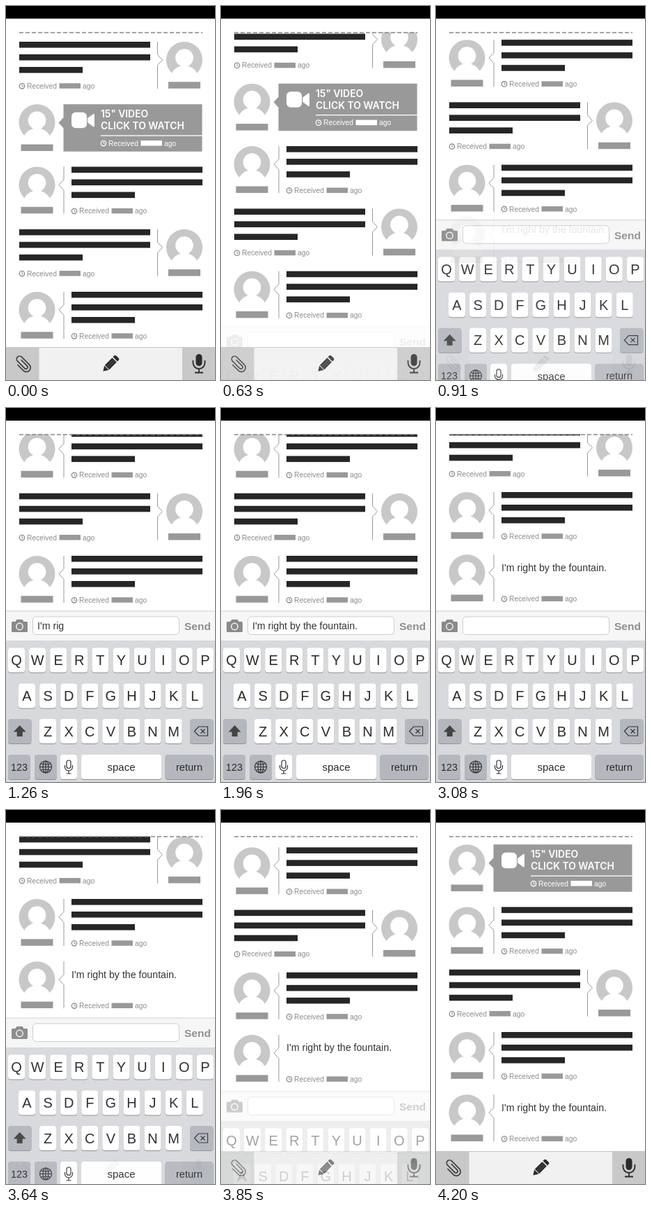
An HTML page for the animation above (4550 ms loop, 300 by 534 pixels).

```html
<!DOCTYPE html>
<html lang="en">
<head>
<meta charset="utf-8">
<title>Message thread</title>
<style>
  html, body { margin: 0; width: 100%; height: 100%; overflow: hidden; background: #fff; }
  svg { display: block; width: 100vw; height: 100vh; font-family: "Liberation Sans", Arial, sans-serif; }
</style>
</head>
<body>
<svg viewBox="0 0 300 534" preserveAspectRatio="none">
  <defs>
    <clipPath id="view"><rect y="37.5" width="300" height="500"/></clipPath>
    <g id="avatar">
      <circle r="26" fill="#c8c8c8"/>
      <circle cy="-3" r="12.8" fill="#fff"/>
      <ellipse cy="26.5" rx="20" ry="18.5" fill="#fff"/>
      <rect x="-23" y="31.3" width="46" height="9.5" fill="#999"/>
    </g>
  </defs>
  <rect width="300" height="534" fill="#fff"/>
  <g clip-path="url(#view)"><g id="list"></g></g>
  <path d="M19 38H282" stroke="#888" stroke-width="1.3" stroke-dasharray="6 3"/>
  <rect width="300" height="18" fill="#000"/>
  <g id="keyboard"></g>
  <g id="ghost"></g>
  <g id="toolbar">
    <rect y="487" width="300" height="47" fill="#f1f1f1"/>
    <path d="M0 487h47.500v47H0zM253 487h47v47h-47z" fill="#c8c8c8"/>
    <path d="M0 487.500H300" stroke="#c4c4c4"/>
    <path transform="translate(24 511) rotate(-45)" d="M2.500-5V6.500a2.500 2.500 0 0 1-5 0V-8a4.200 4.200 0 0 1 8.400 0V7.500a6 6 0 0 1-12 0V-4"
      fill="none" stroke="#3a3a3a" stroke-width="1.6" stroke-linecap="round"/>
    <g transform="translate(150 511) rotate(-45)" fill="#2b2b2b">
      <path d="M-15 0L-8-4.500V4.500zM-7-4.500H8V4.500H-7zM9.500-4.500H12a2 2 0 0 1 2 2V2.500a2 2 0 0 1-2 2H9.500z"/>
      <path d="M-6-1.300H8M-6 1.600H8" stroke="#777" stroke-width=".6"/>
    </g>
    <g fill="none" stroke="#2b2b2b" stroke-width="1.8">
      <rect x="272.500" y="497" width="9" height="17" rx="4.500" fill="#2b2b2b" stroke="none"/>
      <path d="M268.500 506v3.500a8.500 8.500 0 0 0 17 0V506M277 518v5M271 523.500h12"/>
    </g>
  </g>
</svg>
<script>
const $ = id => document.getElementById(id);
const LOOP = 4550, STEP = 70;
const TOP = 51, GAP = 89.25;
const RISE = 197, KEPT = 91;
const NOTE = "I'm right by the fountain.";

const rect = (x, y, w, h, fill, extra = '') =>
  `<rect x="${x}" y="${y}" width="${w}" height="${h}" fill="${fill}" ${extra}/>`;
const text = (x, y, size, fill, str, extra = '') =>
  `<text x="${x}" y="${y}" font-size="${size}" fill="${fill}" ${extra}>${str}</text>`;

// Messages
function received(x, y, ink, block) {
  return `<g fill="none" stroke="${ink}" stroke-width="1.3"><circle cx="${x + 4}" cy="${y}" r="3.700"/>
    <path d="M${x + 4} ${y - 2.2}v2.400h2" stroke-width="1"/></g>`
    + text(x + 11, y + 3.6, 10.3, ink, 'Received')
    + rect(x + 57.5, y - 4, 30.5, 7.5, block)
    + text(x + 91, y + 3.6, 10.3, ink, 'ago');
}

const bars = x => [188, 188, 91].map((w, i) => rect(x, i * 18, w, 8.6, '#262626')).join('');
const avatar = x => `<use href="#avatar" x="${x}" y="26"/>`;
const rule = (x, dir) =>
  `<path d="M${x} 0V18.500l${7 * dir} 7.500l${-7 * dir} 7.500V67" fill="none" stroke="#999"/>`;

const rightMsg = () => bars(19) + received(19, 63.3, '#8c8c8c', '#999') + rule(217.5, 1) + avatar(256);
const leftMsg = body => avatar(44.5) + rule(83, -1) + body + received(94, 63.3, '#8c8c8c', '#999');
const noteMsg = () => leftMsg(text(94, 23.4, 14.2, '#333', NOTE));

function videoMsg() {
  const bold = 'font-weight="600" font-family="Inter, sans-serif"';
  return avatar(44.5)
    + '<path d="M82.500 0H281.500V67.500H82.500V34L75.500 26.500L82.500 19z" fill="#999"/>'
    + rect(94, 11.5, 22, 22.5, '#fff', 'rx="6"')
    + '<path d="M117 20l8-6q2-1 2 1v16q0 2-2 1l-8-6z" fill="#fff"/>'
    + text(136, 19, 13.9, '#fff', '15" VIDEO', bold)
    + text(136, 36, 13.9, '#fff', 'CLICK TO WATCH', bold)
    + rect(136, 44.2, 145.5, 1.3, '#fff')
    + received(136, 55.8, '#fff', '#fff');
}

const messages = [rightMsg(), videoMsg(), leftMsg(bars(94)), rightMsg(), leftMsg(bars(94)), noteMsg()];
$('list').innerHTML = messages.map((m, i) =>
  `<g transform="translate(0 ${TOP + i * GAP})">${m}</g>`).join('');
const lastMsg = $('list').lastElementChild;
$('ghost').innerHTML = `<g transform="translate(0 ${TOP + 5 * GAP - RISE})">${noteMsg()}</g>`;

// Keyboard
function key(x, y, w, label = '', size = 20, fill = '#fff') {
  return rect(x, y + 1, w, 35, '#8d9095', 'rx="4"') + rect(x, y, w, 35, fill, 'rx="4"')
    + text(x + w / 2, y + 17.5 + size * .36, size, '#2b2b2b', label, 'text-anchor="middle"');
}
const row = (letters, x, y) => [...letters].map((c, i) => key(x + i * 30.1, y, 24, c)).join('');
const GREY = '#b4b8be';

$('keyboard').innerHTML = rect(0, 290, 300, 43, '#f6f6f6') + rect(0, 289.5, 300, 1, '#cfcfcf')
  + rect(0, 332, 300, 202, '#d7d9dc')
  + '<path d="M9.500 305h4l2-3h8l2 3h4q1.500 0 1.500 1.500v12q0 1.500-1.500 1.500h-20q-1.500 0-1.500-1.500v-12q0-1.500 1.500-1.500z" fill="#8a8a8a"/>'
  + '<circle cx="19.500" cy="312" r="4.700" fill="none" stroke="#f6f6f6" stroke-width="1.500"/>'
  + rect(38.5, 298, 210, 25.5, '#fff', 'rx="5" stroke="#cdcdcd"')
  + '<text id="typed" x="45" y="315.500" font-size="14.2" fill="#333"></text>'
  + text(256, 317, 15.5, '#8e8e8e', 'Send', 'font-weight="bold"')
  + row('QWERTYUIOP', 3, 342.5) + row('ASDFGHJKL', 18, 393.5) + row('ZXCVBNM', 48, 444)
  + key(3, 444, 33.5, '', 20, GREY) + key(264, 444, 33.5, '', 20, GREY)
  + key(3, 495, 32, '123', 14.4, GREY) + key(41, 495, 32, '', 20, GREY) + key(78, 495, 24)
  + key(108, 495, 115, 'space', 15) + key(228.5, 495, 69, 'return', 14.6, GREY)
  + '<path d="M19.700 453l9 9.500h-5v6.500h-8v-6.500h-5z" fill="#444"/>'
  + `<g fill="none" stroke="#333" stroke-width="1.200">
    <path d="M270.500 461.500l6-6.500h13v13h-13zM279.500 458.500l6 6m0-6l-6 6"/>
    <circle cx="57" cy="512.500" r="8.500"/><ellipse cx="57" cy="512.500" rx="4" ry="8.500"/>
    <path d="M57 504v17M48.500 512.500h17M50.500 508q6.500 2 13 0M50.500 517q6.500-2 13 0"/>
    <rect x="87" y="503" width="6" height="11.500" rx="3"/>
    <path d="M84.500 510v2.500a5.500 5.500 0 0 0 11 0V510M90 518v3.500M86.500 522h7"/></g>`;

const ease = (t, start, dur = 497) => {
  const p = Math.min(1, Math.max(0, (t - start) / dur));
  return (1 - Math.cos(Math.PI * p)) / 2;
};

function draw(t) {
  const open = ease(t, 505, 475 + 20);
  const sent = ease(t, 2568);
  const shut = ease(t, 3580);
  const up = open - shut;
  const posted = t >= 2590;

  $('list').setAttribute('transform', `translate(0 ${-RISE * up - KEPT * sent})`);
  lastMsg.setAttribute('opacity', posted ? 1 : 0);
  $('ghost').setAttribute('opacity', posted ? 0 : 2 * open ** 4 * (1 - open));
  $('keyboard').setAttribute('transform', `translate(0 ${RISE * (1 - up)})`);
  $('keyboard').setAttribute('opacity', up);
  $('toolbar').setAttribute('opacity', 1 - up);

  const count = posted ? 0 : Math.max(0, Math.floor((t - 975) / 37.5));
  $('typed').textContent = NOTE.slice(0, count);
}

const origin = performance.now();
function tick() {
  const t = (performance.now() - origin) % LOOP;
  draw(Math.floor(t / STEP) * STEP);
  requestAnimationFrame(tick);
}
tick();
</script>
</body>
</html>
```
